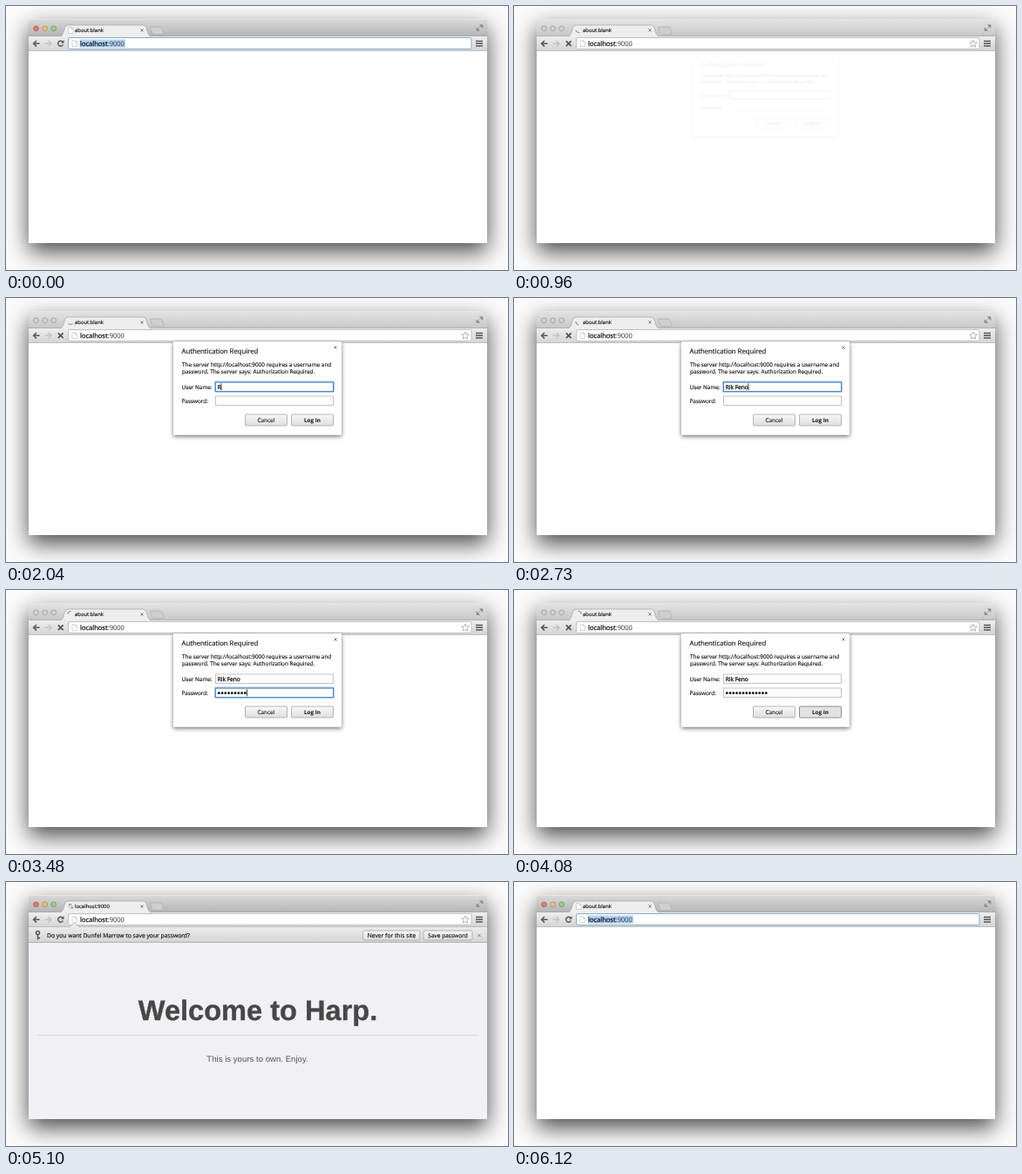
An HTML page that plays this animation: 576x304 px, repeating every 6150 ms.

```html
<!DOCTYPE html>
<html lang="en">
<head>
<meta charset="utf-8">
<title>Login demo</title>
<style>
html, body { margin: 0; width: 100%; height: 100%; overflow: hidden; background: #fbfbfb; }
#shadow { position: absolute; left: 26px; top: 15px; width: 526px; height: 258px; border-radius: 3px;
  box-shadow: 0 10px 26px rgba(0,0,0,.7); }
svg { position: absolute; left: 0; top: 0; width: 576px; height: 304px; }
text { font-family: "Open Sans", "Lucida Grande", sans-serif; font-size: 6.4px; fill: #111;
  stroke: #111; stroke-width: .15px; white-space: pre; text-rendering: geometricPrecision; }
.tab { font-size: 5.92px; }
.url { font-size: 7.56px; stroke-width: .25px; }
.url tspan { fill: #4a4a4a; stroke: #4a4a4a; stroke-width: .1px; }
.bar { font-size: 6.75px; }
.hero { font-family: "Liberation Sans", Helvetica, Arial, sans-serif; stroke: none; text-anchor: middle; }
.mid { text-anchor: middle; }
.line { fill: none; stroke: #555; stroke-width: 1.5; }
.thin { fill: none; stroke: #777; stroke-width: .9; }
.btn { fill: url(#button); stroke: #a5a5a5; stroke-width: .8; }
.field { fill: #fff; stroke: #b4b4b4; stroke-width: .8; }
#dialog { transform-origin: 288px 104px; }
</style>
</head>
<body>
<div id="shadow"></div>
<svg viewBox="0 0 576 304">
  <defs>
    <linearGradient id="title" x2="0" y2="1"><stop stop-color="#dadada"/><stop offset="1" stop-color="#b4b4b4"/></linearGradient>
    <linearGradient id="tool" x2="0" y2="1"><stop stop-color="#eeeeee"/><stop offset="1" stop-color="#d4d4d4"/></linearGradient>
    <linearGradient id="info" x2="0" y2="1"><stop stop-color="#ebebeb"/><stop offset="1" stop-color="#d4d4d4"/></linearGradient>
    <linearGradient id="button" x2="0" y2="1"><stop stop-color="#f8f8f8"/><stop offset="1" stop-color="#dedede"/></linearGradient>
    <filter id="drop" x="-10%" y="-10%" width="120%" height="125%"><feDropShadow dx="0" dy="2" stdDeviation="2.5" flood-opacity=".55"/></filter>
    <clipPath id="view"><path d="M26 52H552V273H26Z"/></clipPath>
    <path id="paper" d="M.5 .5H4L6 2.500V7.500H.5ZM4 .5V2.500H6" fill="#fff" stroke="#c0c0c0" stroke-width=".7"/>
    <path id="cross" d="M-1.600-1.600 1.600 1.600M1.600-1.600-1.600 1.600" class="thin"/>
  </defs>

  <!-- page -->
  <path id="paint" d="M26 52H552V273H26Z" fill="#fff"/>
  <g clip-path="url(#view)">
    <g id="page">
      <text class="hero" x="289" y="140.600" style="font-size:32.6px;font-weight:700;fill:#474747;stroke:#474747;stroke-width:.35px">Welcome to Harp.</text>
      <path id="rule" stroke="#dadade"/>
      <text class="hero" x="288.500" y="189.300" style="font-size:9.65px;fill:#555">This is yours to own. Enjoy.</text>
    </g>
    <g id="infobar">
      <path d="M26 52H552V70H26Z" fill="url(#info)"/>
      <path d="M26 69.500H552" stroke="#b0b0b0"/>
      <path d="M36.500 60V66.500M36.500 64.500H39" class="line"/>
      <circle cx="36.500" cy="58.500" r="2" class="line"/>
      <text class="bar" x="47" y="63.700">Do you want Dunfel Marrow to save your password?</text>
      <rect class="btn" x="409.500" y="56" width="65.500" height="11" rx="2"/>
      <rect class="btn" x="479" y="56" width="56" height="11" rx="2"/>
      <text class="bar mid" x="442.500" y="63.700">Never for this site</text>
      <text class="mid" x="507" y="63.700" style="font-size:6.55px">Save password</text>
      <use href="#cross" x="543" y="61.500"/>
    </g>
  </g>

  <!-- window frame -->
  <path d="M26 35V18Q26 15 29 15H549Q552 15 552 18V35Z" fill="url(#title)"/>
  <path id="dim" d="M26 35V18Q26 15 29 15H549Q552 15 552 18V35Z" fill="#fff" opacity=".25"/>
  <path d="M28 15.500H550" stroke="#e6e6e6"/>
  <path d="M26 34.500H552" stroke="#a6a6a6" stroke-width=".7"/>
  <path d="M26 35H552V52H26Z" fill="url(#tool)"/>
  <path d="M26 51.500H552" stroke="#bcbcbc"/>
  <path d="M166 24H177Q178.500 24 179 25.500L181 31Q181.500 32.500 180 32.500H170Q168 32.500 167.500 31L165.500 25.500Q165 24 166 24Z" fill="#cfcfcf" stroke="#a6a6a6" stroke-width=".6"/>
  <path d="M62 35Q64.500 34.500 65.500 31.500L67.500 25Q68.500 22 71 22H157Q160 22 161 25L163 31.500Q164 34.500 167 35V35.500H62Z" fill="#eee"/>
  <path d="M62 35Q64.500 34.500 65.500 31.500L67.500 25Q68.500 22 71 22H157Q160 22 161 25L163 31.500Q164 34.500 167 35" fill="none" stroke="#a4a4a4" stroke-width=".7"/>
  <g stroke-width=".8">
    <circle class="light" cx="34.500" cy="25.800" r="2.900"/>
    <circle class="light" cx="44.600" cy="25.800" r="2.900"/>
    <circle class="light" cx="54.700" cy="25.800" r="2.900"/>
  </g>
  <path d="M540 28.500V25L543.500 28.500ZM543.500 21.800H547V25.300ZM541 27.500 546 22.500" fill="#888" stroke="#888" stroke-width=".6"/>

  <use id="blankIcon" href="#paper" x="71" y="24"/>
  <path id="spinner" d="M3 0A3 3 0 0 0 -.8-2.900" fill="none" stroke="#858fa6" stroke-width="1.100"/>
  <path id="siteIcon" d="M72 25H74.500V27H72ZM74.500 28.500H77V30.500H74.500ZM72.500 27V30.500M75.500 25.500V28" fill="#aaa" stroke="#999" stroke-width=".4"/>
  <text id="tabTitle" class="tab" x="79" y="30.400"></text>
  <use href="#cross" x="156" y="28"/>

  <path class="line" d="M38.500 43.300H32M35 40 31.600 43.300 35 46.600"/>
  <path class="line" style="stroke:#c4c4c4" d="M44.500 43.300H51M48.500 40 51.900 43.300 48.500 46.600"/>
  <g id="reload"><path class="line" d="M65 41.200A3 3 0 1 0 65.400 44.500"/><path d="M66.500 39.300V42.700H63Z" fill="#555"/></g>
  <path id="stop" class="line" style="stroke-width:1.800" d="M59.800 40.300 65.600 46.100M65.600 40.300 59.800 46.100"/>
  <rect id="omnibox" x="71.500" y="36.500" width="462.500" height="13" rx="1.500" fill="#fff"/>
  <path id="notch" d="M72 52.500 78.500 47 85 52.500" fill="#ebebeb" stroke="#b0b0b0" stroke-width=".7"/>
  <use href="#paper" x="75.500" y="39.300"/>
  <path id="selection" d="M84.500 38.500H137V48H84.500Z" fill="#b4d3f6"/>
  <text class="url" x="85" y="46">localhost<tspan>:9000</tspan></text>
  <path id="star" transform="translate(63.240 5.160) scale(.88)" d="M527 38.300 528.400 41.600 532 41.900 529.300 44.200 530.100 47.700 527 45.800 523.900 47.700 524.700 44.200 522 41.900 525.600 41.600Z" fill="#fff" stroke="#999" stroke-width=".8"/>
  <path class="line" d="M539 40.500H547M539 43.200H547M539 45.900H547"/>

  <!-- login dialog -->
  <g id="dialog">
    <rect x="192" y="50" width="193" height="107.500" rx="1" fill="#fff" filter="url(#drop)"/>
    <use href="#cross" x="378" y="57"/>
    <text x="201.500" y="64.200" style="font-size:7.75px">Authentication Required</text>
    <text x="202" y="78.500">The server http://localhost:9000 requires a username and</text>
    <text x="202" y="86.700">password. The server says: Authorization Required.</text>
    <text x="201.500" y="104.700">User Name:</text>
    <text x="201.500" y="121">Password:</text>
    <rect class="field" x="240.500" y="97" width="135" height="10.500"/>
    <rect class="field" x="240.500" y="113" width="135" height="10.500"/>
    <g id="focus" fill="none">
      <rect x="240" y="96.500" width="136" height="11.500" rx="1" stroke="#a8c6ec" stroke-width="2.200"/>
      <rect x="240.500" y="97" width="135" height="10.500" stroke="#4f83c4" stroke-width=".9"/>
    </g>
    <text id="user" x="242.800" y="104.900" style="font-size:6.6px;stroke-width:.3px"></text>
    <g id="dots" fill="#111"></g>
    <rect id="caret" width=".8" height="8" fill="#111"/>
    <rect class="btn" x="274.500" y="134" width="48" height="13" rx="1"/>
    <rect id="login" class="btn" x="327.500" y="134" width="48" height="13" rx="1"/>
    <text class="mid" x="298.300" y="142.900" style="fill:#333">Cancel</text>
    <text class="mid" x="351.500" y="142.900" style="font-weight:700;stroke:none">Log In</text>
  </g>
</svg>
<script>
const LOOP = 6150, NAME = 'Rik Feno', DOTS = 13;
const pauses = [[780, 930], [1500, 1560], [1860, 2010], [2730, 2880]];
const $ = id => document.getElementById(id);
const clamp = (v, lo, hi) => Math.max(lo, Math.min(hi, v));
const ease = (t, from, to) => { const p = clamp((t - from) / (to - from), 0, 1); return p * p * (3 - 2 * p); };
const show = (id, on) => { $(id).style.display = on ? '' : 'none'; };
const typed = (t, start, gap, max) => clamp(Math.floor((t - start) / gap) + 1, 0, max);

const lights = [...document.querySelectorAll('.light')];
const lightFills = ['#df7a70', '#e6bd84', '#a3c98a'];
const lightEdges = ['#b85a52', '#b98a4c', '#6f9a58'];
$('dots').innerHTML = Array.from({ length: DOTS }, (_, i) =>
  `<circle cx="${244.3 + i * 3.75}" cy="118.700" r="1.400"/>`).join('');
const dots = [...$('dots').children];

function drawChrome(t) {
  const loading = t >= 720 && t < 4380;
  const loaded = t >= 4320 && t < 6090;
  const editing = t < 750 || t >= 6090;
  const inactive = t >= 930 && t < 4170;

  show('dim', inactive);
  lights.forEach((el, i) => {
    el.setAttribute('fill', inactive ? '#d2d2d2' : lightFills[i]);
    el.setAttribute('stroke', inactive ? '#999' : lightEdges[i]);
  });
  show('reload', !loading);
  show('stop', loading);
  show('spinner', loading);
  show('blankIcon', t < 720 || t >= 6090);
  show('siteIcon', loaded && !loading);
  show('selection', editing);
  show('star', !editing);
  $('omnibox').setAttribute('stroke', editing ? '#86abd2' : '#c0c0c0');
  $('tabTitle').textContent = t >= 4770 && t < 6090 ? 'localhost:9000' : 'about:blank';

  const spun = pauses.reduce((s, [a, b]) => s - clamp(t - a, 0, b - a), t);
  $('spinner').setAttribute('transform', `translate(74 27.500) rotate(${10 - (spun - 1170) * .45})`);

  show('page', loaded);
  $('paint').setAttribute('fill', loaded ? '#f1f1f5' : '#fff');
  const slide = t < 6090 ? 18 * ease(t, 4770, 5080) : 0;
  $('page').setAttribute('transform', `translate(0 ${slide})`);
  $('rule').setAttribute('d', `M36 158.500H${slide ? 541.5 : 543.5}`);
  show('infobar', slide > 0);
  show('notch', slide > 5);
  $('infobar').setAttribute('transform', `translate(0 ${slide - 18})`);
}

function drawDialog(t) {
  const open = ease(t, 930, 1140) - ease(t, 4110, 4290);
  show('dialog', open > 0);
  if (open <= 0) return;
  $('dialog').style.opacity = open;
  $('dialog').style.transform = `scale(${.85 + .15 * open})`;

  const onPassword = t >= 2880, clicked = t >= 3960;
  const count = typed(t, 3000, 60, DOTS);
  $('user').textContent = NAME.slice(0, typed(t, 2010, 80, NAME.length));
  dots.forEach((dot, i) => { dot.style.display = i < count ? '' : 'none'; });

  show('focus', !clicked);
  $('focus').setAttribute('transform', `translate(0 ${onPassword ? 16 : 0})`);
  show('caret', !clicked && (t >= 2010 || (t - 1140) % 1000 < 500));
  $('caret').setAttribute('x', 242.5 + (onPassword ? count * 3.75 : $('user').getComputedTextLength()));
  $('caret').setAttribute('y', onPassword ? 114.3 : 98.3);
  $('login').style.fill = clicked ? '#e2e2e2' : '';
  $('login').style.stroke = clicked ? '#777' : '';
}

function frame() {
  const t = performance.now() % LOOP;
  drawChrome(t);
  drawDialog(t);
  requestAnimationFrame(frame);
}
frame();
</script>
</body>
</html>
```
